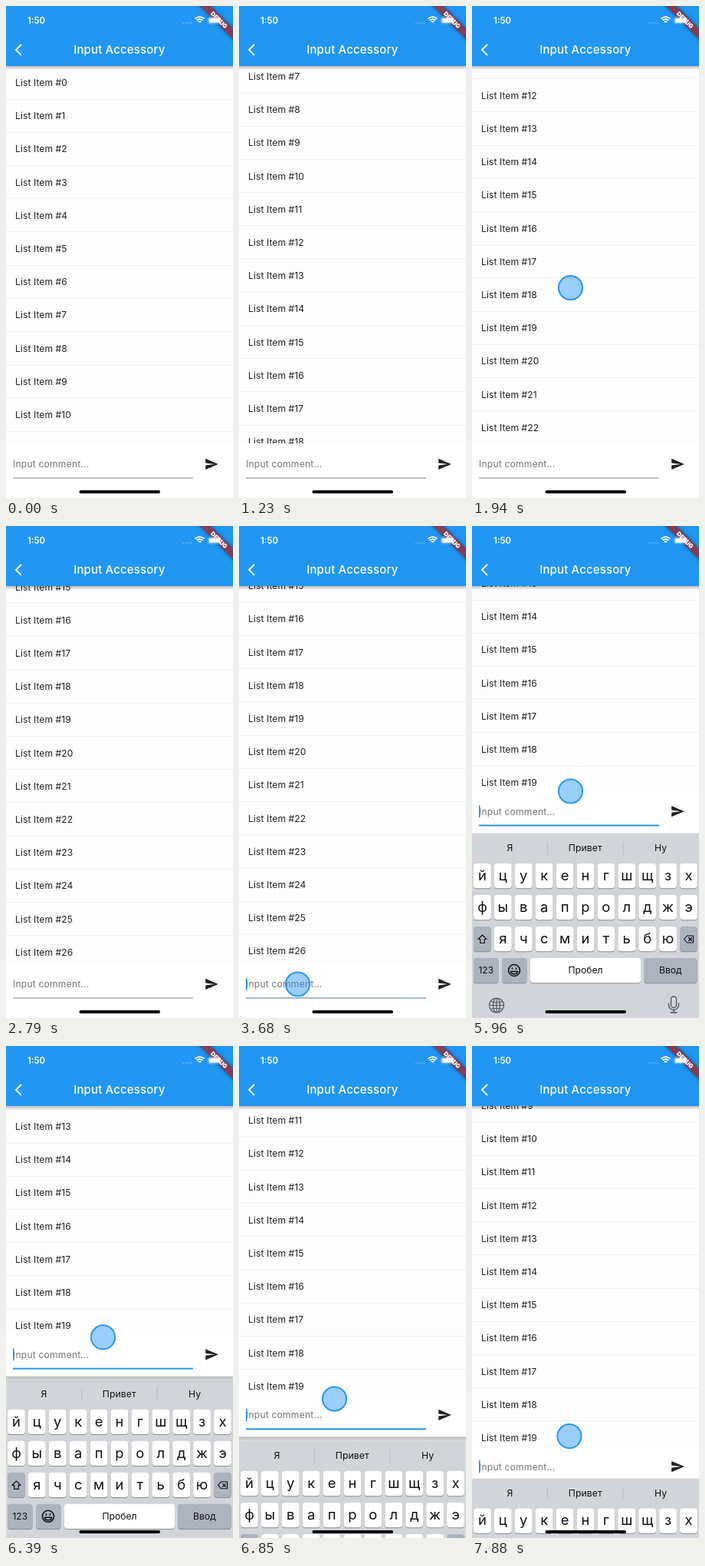
Write an HTML page with a canvas that moves like this. It is 296x640 px and loops after 7990 ms.

```html
<!DOCTYPE html>
<html lang="en">
<head>
<meta charset="utf-8">
<title>Input Accessory</title>
<style>
  html, body { margin: 0; width: 100%; height: 100%; overflow: hidden; background: #fafafa; }
  canvas { display: block; width: 296px; height: 640px; }
</style>
</head>
<body>
<canvas id="stage"></canvas>
<script>
const W = 296, H = 640, LOOP = 7990;
const BLUE = '#2196f3', INK = '#212121';
const ROW = 43.2, HEADER = 78, KEYBOARD_TOP = 386, PANEL_REST = 624.5, LAG = 29;
const canvas = document.getElementById('stage');
const ctx = canvas.getContext('2d');
const dpr = window.devicePixelRatio || 1;
canvas.width = W * dpr;
canvas.height = H * dpr;

// ---- timing ----
const clamp = v => Math.max(0, Math.min(1, v));
const linear = u => u;
const smooth = u => u * u * (3 - 2 * u);
const easeOut = u => 1 - (1 - u) ** 3;

// Each key is [time, value, easing from the previous key].
function track(t, keys) {
  if (t <= keys[0][0]) return keys[0][1];
  for (let i = 1; i < keys.length; i++) {
    const [t0, v0] = keys[i - 1], [t1, v1, ease] = keys[i];
    if (t < t1) return v0 + (v1 - v0) * ease((t - t0) / (t1 - t0));
  }
  return keys[keys.length - 1][1];
}

const gestures = [
  { x: [[0, 128]], y: [[890, 480], [1150, 240, linear]] },
  { x: [[0, 128]], y: [[1850, 400], [2100, 308, linear]] },
  { x: [[0, 76]], y: [[3420, 596], [3780, 596, linear]] },
  { x: [[5960, 128], [6850, 124, smooth], [7880, 126.5, smooth]],
    y: [[5120, 258.8], [5960, 345, smooth], [7700, 565, smooth], [8020, 469, smooth]] }
];
const drag = gestures[3].y;
const dragStart = drag[0][0];

const keyboardY = t => t < dragStart
  ? track(t, [[3700, H], [4250, KEYBOARD_TOP, easeOut]])
  : Math.max(KEYBOARD_TOP, track(t, drag) + 55);

const scrollY = t => t < dragStart
  ? track(t, [[890, 0], [1150, 240, linear], [1850, 468, easeOut],
      [2100, 560, linear], [3000, 669.7, easeOut], [3700, 669.7, linear], [4250, 672.6, easeOut]])
  : 931.3 - track(t - LAG, drag);

function caretAlpha(t) {
  if (t < 3620) return 0;
  const phase = t % 1000;
  return t < 4440 ? 1 : Math.max(clamp((570 - phase) / 120), clamp((phase - 700) / 150));
}

// ---- drawing helpers ----
function text(str, x, y, size, color, { weight = 400, align = 'left', spacing = 0 } = {}) {
  ctx.font = `${weight} ${size}px Inter, Roboto, sans-serif`;
  ctx.letterSpacing = spacing + 'px';
  ctx.textAlign = align;
  ctx.fillStyle = color;
  ctx.fillText(str, x, y + size * 0.364);
}

function rect(x, y, w, h, color) {
  ctx.fillStyle = color;
  ctx.fillRect(x, y, w, h);
}

function round(x, y, w, h, r, color) {
  ctx.beginPath();
  ctx.roundRect(x, y, w, h, r);
  ctx.fillStyle = color;
  ctx.fill();
}

function circle(x, y, r) {
  ctx.beginPath();
  ctx.arc(x, y, r, 0, Math.PI * 2);
}

function icon(x, y, path, color, width = 0) {
  ctx.save();
  ctx.translate(x, y);
  const shape = new Path2D(path);
  if (width) {
    ctx.strokeStyle = color;
    ctx.lineWidth = width;
    ctx.stroke(shape);
  } else {
    ctx.fillStyle = color;
    ctx.fill(shape);
  }
  ctx.restore();
}

function verticalFade(y, h, from, to) {
  const fade = ctx.createLinearGradient(0, y, 0, y + h);
  fade.addColorStop(0, from);
  fade.addColorStop(1, to);
  rect(0, y, W, h, fade);
}

// ---- parts ----
function drawList(scroll) {
  rect(0, 0, W, H, '#fdfdfd');
  const first = Math.max(0, Math.floor((scroll - 50) / ROW));
  for (let i = first; i < first + 15; i++) {
    const y = 99.5 + i * ROW - scroll;
    text('List Item #' + i, 12, y, 12.1, INK, { spacing: 0.08 });
    rect(0, Math.round(y + 21), W, 1, '#efefef');
  }
}

function drawPanel(bottom, t) {
  const y = bottom - 28.5;
  const resting = bottom >= PANEL_REST;
  rect(0, bottom - 55.5, W, resting ? H : 55.5, '#fff');
  if (!resting) {
    rect(0, bottom, W, H - bottom, '#d9dbde');
    verticalFade(bottom, 5, '#b9bbbe', '#d9dbde');
  }
  text('Input comment...', 9, y, 12.1, '#747474', { spacing: 0.2 });

  const focus = clamp((t - 3600) / 250);
  rect(9, y + 17.5, 235, 1, '#8c8c8c');
  ctx.globalAlpha = focus;
  rect(9, y + 17.5, 235, 1 + focus * 0.8, BLUE);
  ctx.globalAlpha = caretAlpha(t);
  rect(9, y - 8, 1.6, 16, BLUE);
  ctx.globalAlpha = 1;

  ctx.save();
  ctx.translate(258.6, y - 9.5);
  ctx.scale(0.79, 0.79);
  icon(0, 0, 'M2 21L23 12 2 3V10L17 12 2 14z', INK);
  ctx.restore();
}

function drawKey(x, y, w, label, size, dark) {
  round(x, y + 1, w, 32.2, 4, '#898c91');
  round(x, y, w, 32.2, 4, dark ? '#acb3bd' : '#fff');
  text(label, x + w / 2, y + (size > 15 ? 15 : 16), size, '#111', { align: 'center' });
}

function drawKeyboard(top) {
  if (top >= H) return;
  ctx.save();
  ctx.translate(0, top);
  rect(0, 0, W, 260, '#d1d4d9');

  ['Я', 'Привет', 'Ну'].forEach((word, i) =>
    text(word, 49.5 + i * 98.3, 19, 12.2, '#111', { align: 'center', spacing: 0.1 }));
  rect(98, 11, 1, 17, '#b9bdc3');
  rect(196.5, 11, 1, 17, '#b9bdc3');

  const column = i => 2.1 + i * 26.9;
  ['йцукенгшщзх', 'фывапролджэ', ' ячсмитьбю '].forEach((letters, row) =>
    [...letters].forEach((letter, i) =>
      drawKey(column(i), 39 + row * 41, 22.7, letter, 18.4, letter === ' ')));
  drawKey(2, 162, 32.5, '123', 12, true);
  drawKey(39, 162, 32.5, '', 12, true);
  drawKey(76, 162, 144, 'Пробел', 12.2);
  drawKey(224, 162, 69.5, 'Ввод', 12.2, true);

  ctx.lineJoin = ctx.lineCap = 'round';
  icon(13.5, 137.5, 'M0 -5.5L5.5 0H2.8V5H-2.8V0H-5.5Z', '#111', 1.2);
  icon(282.5, 137.5, 'M-6 0L-2 -4.5H6V4.5H-2ZM0 -2L4 2M4 -2L0 2', '#111', 1.1);
  icon(55, 178, 'M-7.5 0a7.5 7.5 0 1 0 15 0a7.5 7.5 0 1 0 -15 0M-4.5 1.5H4.5C4 6 -4 6 -4.5 1.5ZM-2.5 -3V-1.7M2.5 -3V-1.7', '#111', 1.6);
  icon(32, 223.5, 'M-9.5 0a9.5 9.5 0 1 0 19 0a9.5 9.5 0 1 0 -19 0M-4.5 0a4.5 9.5 0 1 0 9 0a4.5 9.5 0 1 0 -9 0M0 -9.5V9.5M-9.5 0H9.5M-8 -5Q0 -2.5 8 -5M-8 5Q0 2.5 8 5', '#50555c', 1.2);
  icon(263, 222, 'M-3.5 -6.5a3.5 3.5 0 0 1 7 0V1a3.5 3.5 0 0 1 -7 0ZM-6.5 -1V1a6.5 6.5 0 0 0 13 0V-1M0 7.5V11M-4 11H4', '#50555c', 1.3);
  ctx.restore();
}

function drawHeader() {
  verticalFade(HEADER, 5, 'rgba(0,0,0,.28)', 'rgba(0,0,0,0)');
  rect(0, 0, W, HEADER, BLUE);
  ctx.lineCap = 'butt';
  ctx.lineJoin = 'miter';
  icon(13, 57, 'M7 -7L0 0L7 7', '#fff', 1.9);
  text('Input Accessory', 147.8, 57, 14.9, '#fff', { weight: 500, align: 'center', spacing: 0.2 });

  ctx.save();
  ctx.translate(W, 0);
  ctx.rotate(Math.PI / 4);
  ctx.shadowColor = 'rgba(0,0,0,.5)';
  ctx.shadowBlur = 5;
  rect(-34, 20.9, 68, 9.5, '#7f3f58');
  ctx.shadowColor = 'transparent';
  text('DEBUG', 0, 25.7, 7.8, '#fff', { weight: 900, align: 'center' });
  ctx.restore();

  text('1:50', 28, 19, 11.4, '#fff', { weight: 600 });
  for (let i = 0; i < 4; i++) {
    circle(231 + i * 3.5, 22, 0.8);
    ctx.fillStyle = 'rgba(255,255,255,.5)';
    ctx.fill();
  }
  [2.2, 5.4, 8.4].forEach((r, i) => {
    ctx.beginPath();
    ctx.arc(252.5, 22.5, r, -Math.PI * 0.75, -Math.PI * 0.25);
    ctx.strokeStyle = '#fff';
    ctx.lineWidth = i ? 1.9 : 2.6;
    ctx.stroke();
  });
  ctx.beginPath();
  ctx.roundRect(263.5, 14.5, 17, 8.5, 2.5);
  ctx.strokeStyle = 'rgba(255,255,255,.5)';
  ctx.lineWidth = 0.8;
  ctx.stroke();
  round(264.7, 15.7, 14.6, 6.1, 1.5, '#fff');
  round(281.5, 17.3, 1.2, 3, 0.6, 'rgba(255,255,255,.6)');
}

function drawTouch(t) {
  const touch = gestures.find(({ y }) => t >= y[0][0] && t < y[y.length - 1][0]);
  if (!touch) return;
  circle(track(t, touch.x) + 0.5, track(t, touch.y), 15.6);
  ctx.fillStyle = 'rgba(33,150,243,.46)';
  ctx.fill();
  ctx.strokeStyle = '#2f96ee';
  ctx.lineWidth = 2;
  ctx.stroke();
}

function draw(t) {
  ctx.setTransform(dpr, 0, 0, dpr, 0, 0);
  drawList(scrollY(t));
  drawPanel(Math.min(PANEL_REST, keyboardY(t - LAG)), t);
  drawHeader();
  drawKeyboard(keyboardY(t));
  round(95.5, 630, 105.5, 4, 2, '#000');
  drawTouch(t);
}

const start = performance.now();
function tick() {
  draw((performance.now() - start) % LOOP);
  requestAnimationFrame(tick);
}
tick();
</script>
</body>
</html>
```
